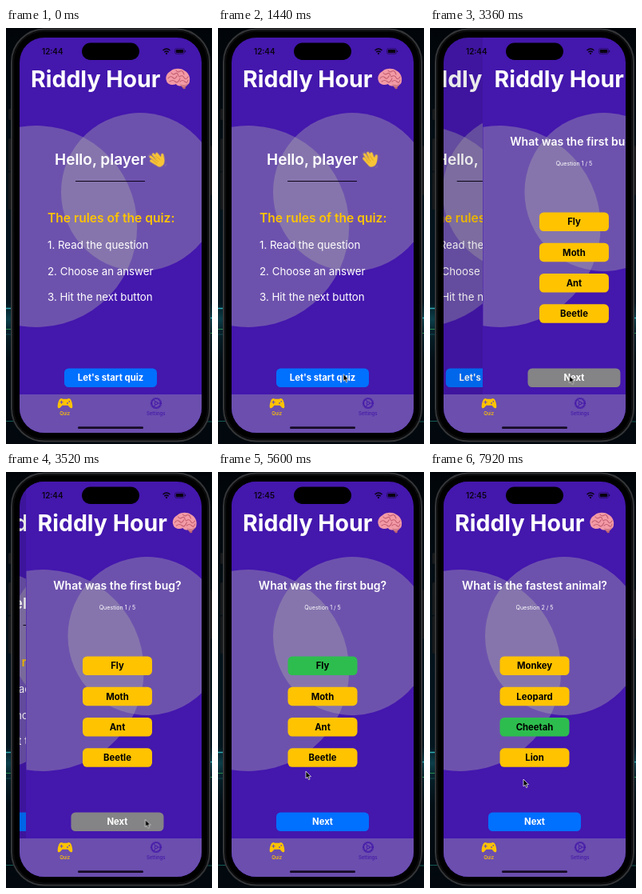
Recreate the animation shown at these times as an HTML page. Size 258x520 px, loop 8 s.

```html
<!DOCTYPE html>
<html lang="en">
<head>
<meta charset="utf-8">
<title>Riddly Hour</title>
<style>
html, body { margin: 0; width: 100%; height: 100%; overflow: hidden; background: #02070c; }
svg { display: block; width: 258px; height: 520px; font-family: Inter, Roboto, sans-serif; }
.title { font-size: 28.5px; font-weight: 700; fill: #fff; }
.hello { font-size: 19px; font-weight: 600; fill: #fff; }
.head { font-size: 15.6px; font-weight: 600; fill: #ffc400; }
.rule { font-size: 13.3px; fill: #fff; }
.ask { font-size: 14px; font-weight: 600; fill: #fff; }
.count { font-size: 7.1px; fill: #fff; }
.btn { font-size: 11.3px; font-weight: 700; }
.tab { font-size: 6px; font-weight: 500; }
.clock { font-size: 9.8px; font-weight: 600; fill: #08030f; }
.mid { text-anchor: middle; }
.white { fill: #fff; }

#home, #quiz, #shade, #next, #pickFly, #pickCheetah, #q1, #q2, #t1, #t2, #cursor {
  animation: 8s linear infinite;
}
#home { animation-name: leave; }
#shade { animation-name: dim; }
#quiz { animation-name: enter; }
#q1, #t1, #q2, #t2, #next, #pickFly, #pickCheetah { animation-timing-function: step-end; }
#q1 { animation-name: q1; }
#q2 { animation-name: q2; }
#t1 { animation-name: t1; }
#t2 { animation-name: t2; }
#next { animation-name: next; }
#pickFly { animation-name: fly; }
#pickCheetah { animation-name: cheetah; }
#cursor { animation-name: point; }
#wave { transform-origin: 192px 168px; animation: wave 1s ease-in-out infinite alternate; }

@keyframes leave {
  0%, 40% { transform: translateX(0); animation-timing-function: cubic-bezier(.2,.6,.2,1); }
  46.25%, 100% { transform: translateX(-68px); }
}
@keyframes dim {
  0%, 40% { opacity: 0; animation-timing-function: cubic-bezier(.2,.6,.2,1); }
  46.25%, 100% { opacity: .1; }
}
@keyframes enter {
  0%, 40% { transform: translateX(228px); animation-timing-function: cubic-bezier(.2,.6,.2,1); }
  46.25%, 100% { transform: translateX(0); }
}
@keyframes q1 { 0% { opacity: 1; } 78%, 100% { opacity: 0; } }
@keyframes q2 { 0% { opacity: 0; } 78%, 100% { opacity: 1; } }
@keyframes t1 { 0% { opacity: 1; } 55%, 100% { opacity: 0; } }
@keyframes t2 { 0% { opacity: 0; } 55%, 100% { opacity: 1; } }
@keyframes next {
  0%, 78% { fill: #848386; }
  59%, 90%, 100% { fill: #0070ff; }
}
@keyframes fly { 0%, 78%, 100% { fill: #ffc300; } 59% { fill: #2dbd4e; } }
@keyframes cheetah { 0% { fill: #ffc300; } 90%, 100% { fill: #2dbd4e; } }
@keyframes wave { from { transform: rotate(-14deg); } to { transform: rotate(14deg); } }
@keyframes point {
  0%, 10% { transform: translate(262px, 380px); animation-timing-function: ease-out; }
  17.5%, 22% { transform: translate(157px, 432.5px); animation-timing-function: ease-in-out; }
  32%, 46% { transform: translate(174.5px, 434.5px); animation-timing-function: ease-in-out; }
  57%, 61% { transform: translate(131px, 243px); animation-timing-function: ease-in-out; }
  69%, 71% { transform: translate(110px, 374px); animation-timing-function: ease-in-out; }
  76.5%, 82% { transform: translate(100px, 442px); animation-timing-function: ease-in-out; }
  88.5%, 92% { transform: translate(122px, 321px); animation-timing-function: ease-in-out; }
  98.5%, 100% { transform: translate(117px, 384px); }
}
</style>
</head>
<body>
<svg viewBox="0 0 258 520">
  <defs>
    <linearGradient id="room" x2="0" y2="1">
      <stop offset="0" stop-color="#010509"/>
      <stop offset=".4" stop-color="#04121a"/>
      <stop offset=".66" stop-color="#04161f"/>
      <stop offset=".7" stop-color="#0b3f4a"/>
      <stop offset=".73" stop-color="#06212a"/>
      <stop offset=".8" stop-color="#030d14"/>
      <stop offset="1" stop-color="#02080d"/>
    </linearGradient>
    <clipPath id="screen"><rect x="17" y="12" width="228" height="494" rx="31"/></clipPath>

    <g id="brain">
      <path d="M216 68l6 8q2 1 3-1l-3-9z" fill="#b9606e"/>
      <path d="M201 66c-2-5 1-10 5-12 4-4 13-4 17-1 5 2 8 8 7 13 0 5-5 7-9 5-3 3-7 1-8-1-4 2-11 1-12-4z" fill="#f29aa6"/>
      <path d="M218 70q6 3 10-1q-1 5-6 5q-3-1-4-4z" fill="#d17b88"/>
      <g fill="none" stroke="#c45f72" stroke-width="1.1" stroke-linecap="round">
        <path d="M203 63q3-4 6-1t5-2M207 56q2 3 5 1t4 3M213 53q2 3 5 1t5 4M205 67q4-3 7 0t6-4M217 61q4-3 6 1t5-1M218 67q3-3 6 0t4-2"/>
      </g>
    </g>

    <g id="backdrop">
      <rect x="17" y="0" width="228" height="520" fill="#4417ad"/>
      <g fill="#aaaaac" fill-opacity=".4">
        <path d="M17 123.8A126 126 0 1 1 17 372.2z"/>
        <path d="M245 142.8A99 99 0 1 0 245 267.2z"/>
      </g>
      <text class="title" x="31" y="74">Riddly Hour</text>
      <use href="#brain"/>
    </g>
    <rect id="option" x="87.5" width="87" height="23.5" rx="5.5"/>
    <rect id="action" x="73" y="425.5" width="116" height="23.5" rx="5.5"/>
  </defs>

  <rect width="258" height="520" fill="url(#room)"/>
  <g fill="none">
    <path d="M0 350.5H8M253 362.5h5" stroke="#2fa9b4" stroke-width="1.4"/>
    <path d="M0 376.5H8M253 381.5h5" stroke="#258b4e" stroke-width="1.2"/>
    <path d="M0 383H8" stroke="#0e4a50"/>
    <path d="M0 491.5H12M250 492h8" stroke="#135a55"/>
  </g>

  <g fill="#17191b">
    <rect x="3" y="101" width="5" height="14" rx="1.5"/>
    <rect x="3" y="138" width="5" height="41" rx="1.5"/>
    <rect x="3" y="180" width="5" height="47" rx="1.5"/>
    <rect x="254" y="147" width="4" height="62" rx="1.5"/>
  </g>
  <rect x="7" y="1.5" width="248" height="515" rx="41" fill="#050506" stroke="#343537" stroke-width="2"/>
  <rect x="9.5" y="4" width="243" height="510" rx="38" fill="#000" stroke="#111214"/>

  <g clip-path="url(#screen)">
    <g id="home">
      <use href="#backdrop"/>
      <text class="hello" x="61" y="171">Hello, player</text>
      <g id="wave">
        <path d="M183 158.500l8 9M187 156.500l6 9M191.500 157l4 9M182.500 163.500l7 7" stroke="#f9c536" stroke-width="3.2" stroke-linecap="round"/>
        <path d="M187 167l8-6 1 1q0-4 2-4t1.500 4q0 7-3 10-4 3-7 1z" fill="#f9c536"/>
        <path d="M186 161l5 6M190 159.500l4 6M185.500 165l4 4" stroke="#c98713" stroke-width=".6"/>
        <path d="M180.500 158q.5-2.500 3-3M197.500 174.500q2-.5 2.500-2.500" fill="none" stroke="#8f7ba8" stroke-width=".8"/>
      </g>
      <path d="M87 191.500H174" stroke="#0a0315" stroke-width="1.2"/>
      <text class="head" x="52" y="243">The rules of the quiz:</text>
      <g class="rule">
        <text x="52" y="276">1. Read the question</text>
        <text x="52" y="308.500">2. Choose an answer</text>
        <text x="52" y="341">3. Hit the next button</text>
      </g>
      <use href="#action" fill="#0070ff"/>
      <text class="btn mid white" x="131" y="441.300">Let's start quiz</text>
      <rect id="shade" x="17" width="300" height="520"/>
    </g>

    <g id="quiz">
      <use href="#backdrop"/>
      <g fill="#ffc300">
        <use id="pickFly" href="#option" y="230.500"/>
        <use href="#option" y="268.700"/>
        <use id="pickCheetah" href="#option" y="307"/>
        <use href="#option" y="345.300"/>
      </g>
      <use id="next" href="#action"/>
      <text class="btn mid white" x="131" y="441.300">Next</text>
      <g id="q1" class="mid">
        <text class="ask" x="131" y="146.500">What was the first bug?</text>
        <text class="count" x="131" y="172">Question 1 / 5</text>
        <g class="btn">
          <text x="131" y="246.400">Fly</text>
          <text x="131" y="284.600">Moth</text>
          <text x="131" y="322.900">Ant</text>
          <text x="131" y="361.200">Beetle</text>
        </g>
      </g>
      <g id="q2" class="mid">
        <text class="ask" x="131" y="146.500">What is the fastest animal?</text>
        <text class="count" x="131" y="172">Question 2 / 5</text>
        <g class="btn">
          <text x="131" y="246.400">Monkey</text>
          <text x="131" y="284.600">Leopard</text>
          <text x="131" y="322.900">Cheetah</text>
          <text x="131" y="361.200">Lion</text>
        </g>
      </g>
    </g>

    <!-- tab bar -->
    <rect x="17" y="458" width="228" height="50" fill="#6b4eae"/>
    <path d="M68 463.500q2-1 3 .3h6q1-1.300 3-.3c2 1 3.500 7 3.300 10-.3 2.500-2.300 2-3.500.8l-2.300-2.500h-7l-2.300 2.500c-1.200 1.200-3.200 1.700-3.500-.8-.2-3 1.300-9 3.300-10z" fill="#ffc300"/>
    <path d="M67.500 467.800h4M69.500 465.800v4" stroke="#6b4eae" stroke-width="1.100"/>
    <g fill="#6b4eae"><circle cx="77" cy="469" r=".9"/><circle cx="79.300" cy="466.800" r=".9"/></g>
    <text class="tab mid" x="73.700" y="484" fill="#ffc300">Quiz</text>
    <g fill="none" stroke="#4519a9">
      <circle cx="188" cy="469" r="6.500" stroke-width="1.200" stroke-dasharray="1.500 .542"/>
      <circle cx="188" cy="469" r="5.500" stroke-width="1.200"/>
      <circle cx="188" cy="469" r="1.800"/>
      <path d="M189.800 469h4M187.100 467.400l-2-3.400M187.100 470.600l-2 3.400"/>
    </g>
    <text class="tab mid" x="187.700" y="484" fill="#4519a9">Settings</text>
    <rect x="90" y="498.300" width="82" height="2.800" rx="1.400" fill="#160b25"/>

    <!-- status bar -->
    <text id="t1" class="clock" x="45" y="32.700">12:44</text>
    <text id="t2" class="clock" x="45" y="32.700">12:45</text>
    <rect x="95" y="18.500" width="72" height="21.500" rx="10.750" fill="#000"/>
    <g fill="none" stroke="#08030f" stroke-width="1.500">
      <path d="M196.500 28q4.500-4 9 0M198.300 30.200q2.700-2.300 5.400 0"/>
      <circle cx="201" cy="32" r=".4"/>
      <rect x="211.500" y="25.700" width="12" height="6.800" rx="2" stroke-width=".7" opacity=".6"/>
    </g>
    <rect x="212.700" y="26.900" width="9.600" height="4.400" rx="1" fill="#08030f"/>
    <path d="M224.700 28v2.200" stroke="#08030f" stroke-width=".8"/>
  </g>

  <path id="cursor" d="M0 0V9L2.100 7.200 3.600 10.600 5.100 9.900 3.700 6.700H6.500z" fill="#000" stroke="#fff" stroke-width=".7"/>
</svg>
</body>
</html>
```
